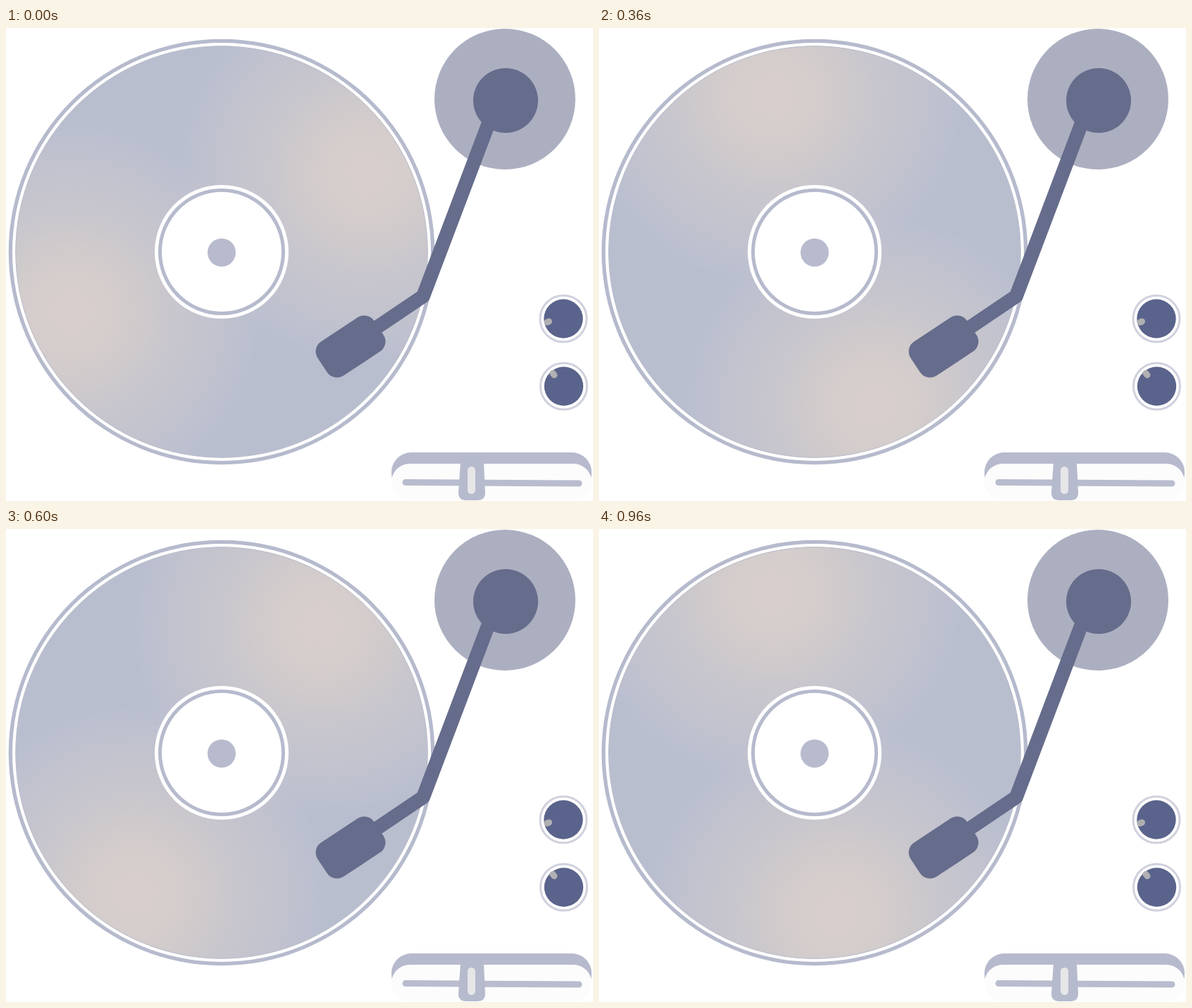
An HTML page that plays this animation: 833 px wide and 672 px high, repeating every 1080 ms.

```html
<!DOCTYPE html>
<html lang="en">
<head>
<meta charset="utf-8">
<title>Turntable</title>
<style>
  html, body { margin: 0; width: 100%; height: 100%; overflow: hidden; background: #fff; }
  svg { display: block; width: 833px; height: 672px; }
</style>
</head>
<body>
<svg viewBox="0 0 833 672">
  <defs>
    <radialGradient id="glow">
      <stop offset="0" stop-color="#d8cfcd"/>
      <stop offset=".2" stop-color="#d8cfcc" stop-opacity=".92"/>
      <stop offset=".37" stop-color="#d8cfca" stop-opacity=".7"/>
      <stop offset=".56" stop-color="#d8cfcc" stop-opacity=".46"/>
      <stop offset=".8" stop-color="#d8cfcc" stop-opacity=".24"/>
      <stop offset="1" stop-color="#d8cfcc" stop-opacity="0"/>
    </radialGradient>
    <clipPath id="face"><circle r="292.5"/></clipPath>
    <g id="knob">
      <circle r="33" fill="#fff" stroke="#cfd1dd" stroke-width="3"/>
      <circle r="27.7" fill="#5a638b"/>
    </g>
  </defs>

  <g transform="translate(306 318)">
    <circle r="302.3" fill="#b6bacd"/>
    <circle r="297" fill="#fff"/>
    <g id="disc" clip-path="url(#face)">
      <circle r="293" fill="#b9becf"/>
      <circle cx="-213" cy="86" r="270" fill="url(#glow)"/>
      <circle cx="206" cy="-112" r="270" fill="url(#glow)"/>
    </g>
    <circle r="292.2" fill="none" stroke="#bbbdcb"/>
    <circle r="95" fill="#fff"/>
    <circle r="87.5" fill="none" stroke="#b6bacd" stroke-width="5"/>
    <circle cy="1" r="20" fill="#b8bbce"/>
  </g>

  <circle cx="708" cy="101" r="100" fill="#acafc0"/>
  <g fill="#666c8b">
    <circle cx="709" cy="103" r="46"/>
    <path d="M685 135L592 381L515 433" fill="none" stroke="#666c8b" stroke-width="20" stroke-linejoin="round"/>
    <rect x="-48" y="-29" width="96" height="58" rx="17" transform="translate(489 452.5) rotate(-33.5)"/>
  </g>

  <use href="#knob" x="791" y="413"/>
  <use href="#knob" x="791.5" y="509"/>
  <g stroke="#b0b0b3" stroke-width="9" stroke-linecap="round">
    <path d="M768 418L770.5 417M776 490.5L778 493"/>
  </g>

  <rect x="547" y="603" width="284" height="58" rx="28" fill="#b7bacd"/>
  <rect x="547" y="619" width="284" height="52" rx="26" fill="#fcfcfc"/>
  <path d="M567 645.5L813 647" stroke="#b8bcce" stroke-width="9" stroke-linecap="round"/>
  <path d="M645 617H678L680 660Q680 671 669 671H653Q642 671 642 660Z" fill="#b6bacd"/>
  <rect x="655" y="623" width="11" height="39" rx="5.5" fill="#e6e6e8"/>
</svg>
<script>
  // The spin is stepped: slow mid-loop, fast around the loop point.
  const STEP = 120;
  const angles = [0, 47, 72, 97, 123, 150, 190, 233, 284];
  const disc = document.getElementById('disc');

  function draw() {
    const step = Math.floor(performance.now() / STEP) % angles.length;
    disc.setAttribute('transform', `rotate(${angles[step]})`);
    requestAnimationFrame(draw);
  }
  draw();
</script>
</body>
</html>
```
